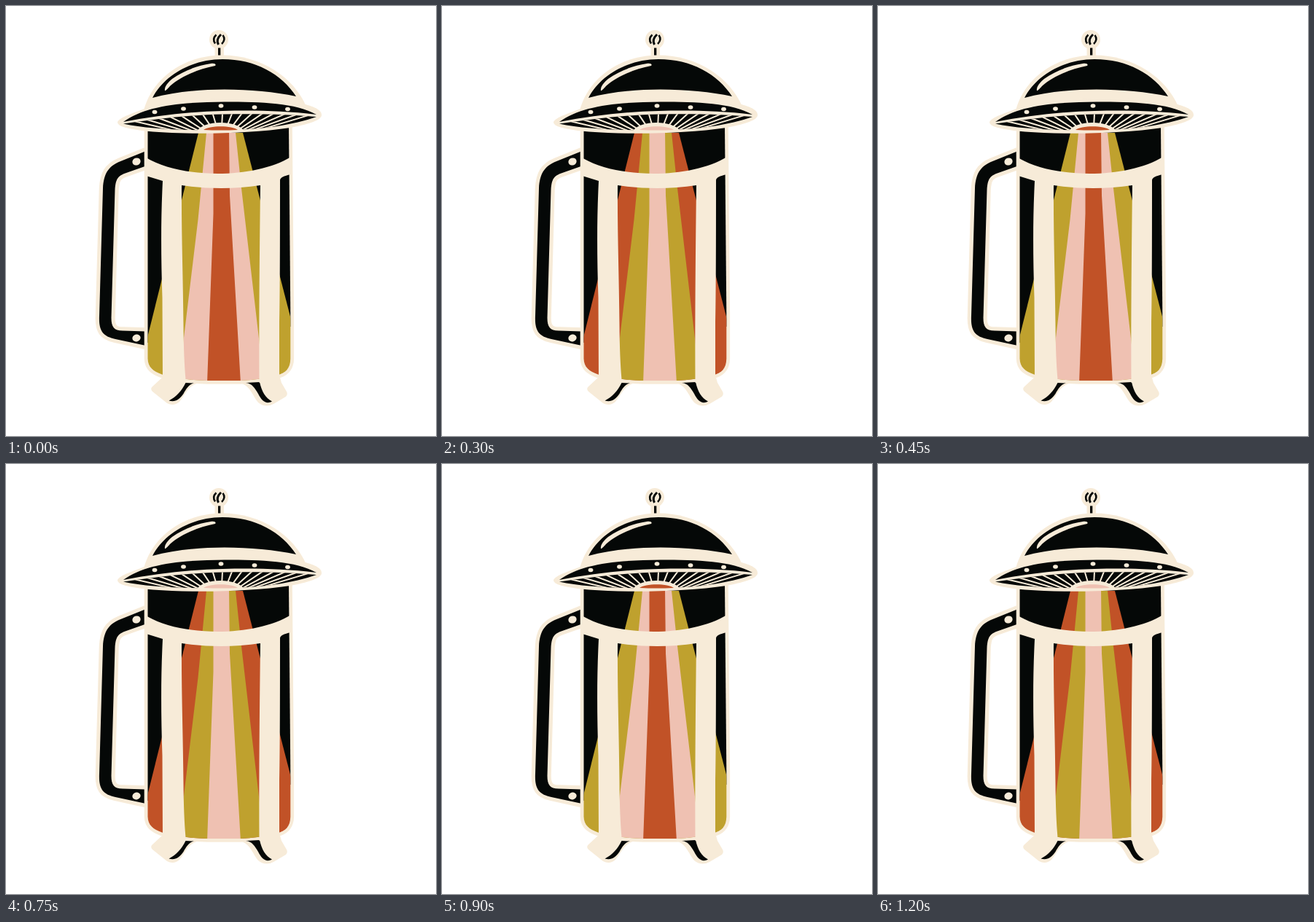
Animation of 590x590 px, one loop 1.35 s. Source, as an HTML page:

```html
<!DOCTYPE html>
<html lang="en">
<head>
<meta charset="utf-8">
<title>Saucer coffee press</title>
<style>
  html, body { margin: 0; width: 100%; height: 100%; overflow: hidden; background: #fff; }
  svg { display: block; width: 590px; height: 590px; }
  .cream { fill: #f7ebd8; }
  .black { fill: #050807; }
  .line { fill: none; stroke: #f7ebd8; }
  .ink { fill: none; stroke: #050807; }
</style>
</head>
<body>
<svg viewBox="0 0 590 590">
  <defs>
    <path id="glass" d="M194.500 165H388L390.300 420V484C390 498 383 503 374 506Q350 513 322 514H276Q240 513 214 505.500C202 501 195 496 194.500 484Z"/>
    <path id="underside" d="M161 161.500C205 155 250 149.500 298 148.500C345 147.500 390 148.500 426 152C395 163 350 170 300 170C245 171 195 169 161 161.500Z"/>
    <path id="grip" d="M192 199L156 213.500C140 220 134 231 133 250L128 425C127 446 133 453 150 457L192 466V446.500L160 445.500C148 445.500 144.500 440 144.500 428L149.500 252C150.500 238 153 233 165 229L192 219.500Z"/>
    <clipPath id="inGlass"><use href="#glass"/></clipPath>
    <clipPath id="inUnderside"><use href="#underside"/></clipPath>
  </defs>

  <!-- handle -->
  <use href="#grip" class="line" stroke-width="10.500" stroke-linejoin="round"/>
  <use href="#grip" class="black"/>
  <ellipse class="cream" cx="179" cy="213.500" rx="5.700" ry="5" transform="rotate(-20 179 213.500)"/>
  <ellipse class="cream" cx="179" cy="455.500" rx="5.700" ry="4.800" transform="rotate(-15 179 455.500)"/>

  <!-- glass and beam -->
  <use href="#glass" class="cream" stroke="#f7ebd8" stroke-width="9.600"/>
  <path class="black" d="M194.500 165H388L390.300 420V440L194.500 462Z"/>
  <g clip-path="url(#inGlass)">
    <path data-beam="2" d="M264 174L179 515H413L325 174Z"/>
    <path data-beam="1" d="M275 174L263.500 293L244 455L237 518H354L347 456L323 250L315 174Z"/>
    <path data-beam="0" d="M284.500 170V285Q284 300 276 518H322L307 260L306 170Z"/>
  </g>

  <!-- feet -->
  <path class="cream" d="M214 510L200 523Q198 526 201 529L221 545Q230 550 238 543C245 535 249 522 262 518L247 513Z"/>
  <path class="cream" d="M347 513L324 518C336 523 339 536 346 544Q356 552 367 546L384 536Q387 533 385 529L378 517L375 506Z"/>
  <path class="black" d="M246.500 517C241 528 234 536 223.500 541.500C232 544 238 540 243.500 532C247.500 525 251 519 258 517.500Z"/>
  <path class="black" d="M329 517C338 518 341 524 346 532C351 542 357 547 365 542.500C356 538 351 529 348 516Z"/>

  <!-- frame -->
  <path class="cream" d="M192 208C240 237 340 238 391 207V231Q376 234 376 239C376 300 376 400 375 440V517H347.500C347 430 348 330 349 246Q295 254 241 246C240.500 310 243 370 243.500 440Q244 490 247 517H215L214.500 400C212.500 340 212.500 290 215 240L192 233Z"/>

  <!-- antenna -->
  <circle class="cream" cx="292" cy="46" r="13"/>
  <path class="cream" d="M286.500 55H299V71H286.500Z"/>
  <path class="black" d="M291 57.500H294.300V69H291Z"/>
  <path class="ink" stroke-width="2.500" d="M288.500 39.500Q282.500 45 287 51.500M297.500 40Q302 46 296 52"/>
  <path class="ink" stroke-width="3" d="M295 39Q287.500 46 291.500 53"/>

  <!-- saucer -->
  <path class="cream" d="M189 143C201 98 245 67.500 297 67.500C350 67.500 395 98 412 138Z"/>
  <path class="cream" d="M153 160C153 155 165 150 190 141C250 124 350 122 411 135C428 140 433 144 433 150C432 158 410 163 390 167C330 176 240 177 186 171C165 168 154 165 153 160Z"/>
  <path class="black" d="M201 126C217 95 255 73 297 73C342 73 378 93 398 124C340 112 260 110 201 126Z"/>
  <path class="cream" d="M218 116C217 111 222 105 228 100C243 89 262 82 281 79C286 78 289 80 287 82C262 87 240 97 226 109C222 113 219 117 218 116Z"/>
  <path class="black" d="M161 159C190 138 235 132 300 131.500C350 131.500 398 133 426 149C380 143.500 340 143 297 144C250 145 205 151 161 159Z"/>
  <g id="lamps" class="cream"></g>
  <use href="#underside" class="black"/>
  <path id="ribs" class="line" stroke-width="2" clip-path="url(#inUnderside)"/>
  <path class="cream" d="M262 172C270 156 318 156 327 172Z"/>
  <path data-beam="0" d="M271 170C278 163.500 311 163.500 318 170Q294 171 271 170Z"/>
</svg>
<script>
  const STEP = 150;
  const COLORS = ['#c15227', '#efc1b2', '#bfa12e'];
  const beams = document.querySelectorAll('[data-beam]');

  const lamps = [[204, 145.5], [243.5, 141], [295, 137], [341, 139], [386.5, 141.5]];
  document.getElementById('lamps').innerHTML = lamps
    .map(([x, y]) => `<ellipse cx="${x}" cy="${y}" rx="3.4" ry="2.8"/>`).join('');

  // Ribs run from the tilted rim towards a focus below the saucer.
  let ribs = '';
  for (let i = -8; i <= 8; i++) {
    const dx = i * 13 + i * Math.abs(i) * 0.25;
    const rimY = 147.5 + 8 * (dx / 135) ** 2 - 0.037 * dx;
    ribs += `M${297 + dx} ${rimY}L295 186`;
  }
  document.getElementById('ribs').setAttribute('d', ribs);

  function draw(time) {
    const step = Math.floor(time / STEP) % 3;
    for (const beam of beams) {
      const color = (Number(beam.dataset.beam) + 2 * step) % 3;
      beam.setAttribute('fill', COLORS[color]);
    }
  }

  const start = performance.now();
  function tick() {
    draw(performance.now() - start);
    requestAnimationFrame(tick);
  }
  tick();
</script>
</body>
</html>
```
